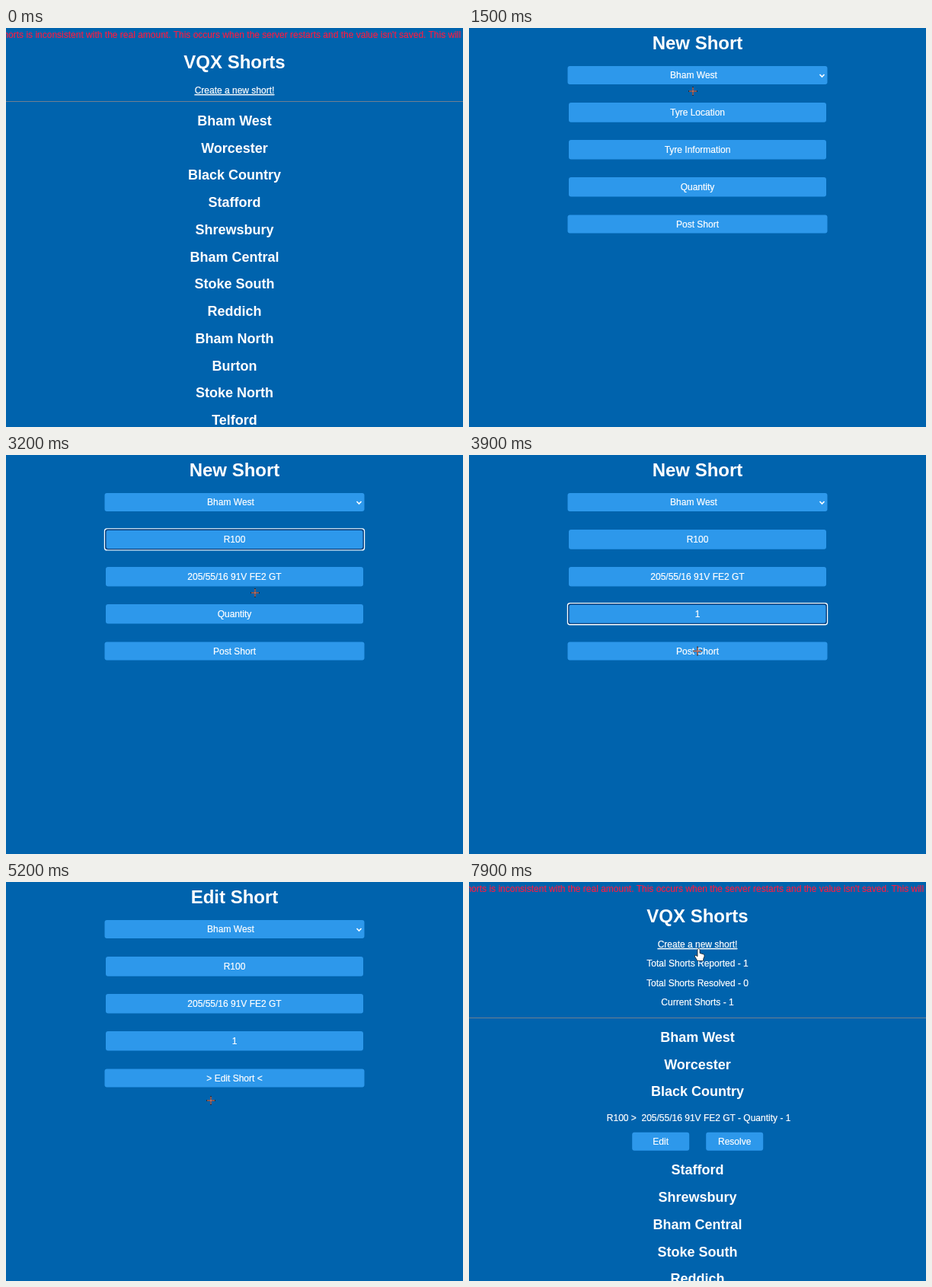
Write an HTML page that moves like this. It is 600 by 524 pixels and loops after 8 s.

```html
<!DOCTYPE html>
<html lang="en">
<head>
<meta charset="utf-8">
<title>Shorts</title>
<style>
html, body { margin: 0; width: 100%; height: 100%; overflow: hidden; background: #0063ad; }
svg { display: block; width: 600px; height: 524px; }
text { font: 12px "Liberation Sans", Arial, sans-serif; fill: #fff; stroke: #fff; stroke-width: .2;
  text-anchor: middle; white-space: pre; }
.h1 { font-size: 24px; font-weight: bold; stroke: none; }
.h2 { font-size: 18px; font-weight: bold; stroke: none; }
.link { text-decoration: underline; }
.warn { fill: #f51e46; stroke: #f51e46; text-anchor: start; }
.box { fill: #2d98eb; }
.line { fill: #6f7f92; }
.ring { fill: none; stroke: #fff; stroke-width: 1.4; }
.inner { stroke: #0b3f7c; }
</style>
</head>
<body>
<svg viewBox="0 0 600 524">
  <g id="pages"></g>
  <g id="cross">
    <path d="M-6 0H6M0-6V6" stroke="#1d2026" stroke-width="2" stroke-opacity=".75"/>
    <path d="M-5 0H5M0-5V5" stroke="#f08068"/>
  </g>
  <path id="hand" fill="#fff" stroke="#111" stroke-width=".7" stroke-linejoin="round"
    d="M-1.5 1Q0-1 1.5 1V6L6 7.2Q8 8 7.5 10L6 14V16H-1.5L-5 10.5Q-5.5 8.3-3.5 8.8L-1.5 10.3Z"/>
</svg>
<script>
const LOOP = 8000, MID = 300, PITCH = 35.73;
const SPEC = '205/55/16 91V FE2 GT';
const DEPOTS = ['Bham West', 'Worcester', 'Black Country', 'Stafford', 'Shrewsbury', 'Bham Central',
  'Stoke South', 'Reddich', 'Bham North', 'Burton', 'Stoke North', 'Telford'];
const WARNING = "horts is inconsistent with the real amount. This occurs when the server " +
  "restarts and the value isn't saved. This will be";
const $ = id => document.getElementById(id);
const show = (el, on) => el.style.display = on ? '' : 'none';
const place = (el, x, y) => el.setAttribute('transform', `translate(${x} ${y})`);
const row = i => 62 + 48.9 * i; // middle of a form row

function add(parent, tag, attrs, content = '') {
  const el = document.createElementNS('http://www.w3.org/2000/svg', tag);
  for (const key in attrs) el.setAttribute(key, attrs[key]);
  el.textContent = content;
  return parent.appendChild(el);
}
const label = (g, x, y, content, cls = '') => add(g, 'text', { x, y, class: cls }, content);

// Rounded rectangle around a middle point
const box = (g, x, y, width, height, cls = 'box') =>
  add(g, 'rect', { x: x - width / 2, y: y - height / 2, width, height, rx: 3, class: cls });

// The depot list; "holder" is the depot that has the reported short, -1 for none.
function listPage(holder) {
  const g = add($('pages'), 'g');
  label(g, -3.6, 13, WARNING, 'warn');
  label(g, MID, 53, 'VQX Shorts', 'h1');
  label(g, MID, 86, 'Create a new short!', 'link');
  const counts = holder < 0 ? [] :
    ['Total Shorts Reported - 1', 'Total Shorts Resolved - 0', 'Current Shorts - 1'];
  counts.forEach((s, i) => label(g, MID, 111.3 + 25.3 * i, s));

  let y = 128 + 27.3 * counts.length;
  add(g, 'rect', { x: 0, y: Math.round(y - 32), width: 600, height: 1, class: 'line' });
  DEPOTS.forEach((name, i) => {
    label(g, MID, y, name, 'h2');
    if (i === holder) {
      label(g, MID + 1.6, y + 33, `R100 >  ${SPEC} - Quantity - 1`);
      ['Edit', 'Resolve'].forEach((s, k) => {
        const x = 251.7 + 97 * k;
        box(g, x, y + 59.5, 75, 24);
        label(g, x, y + 63.2, s);
      });
      y += 67.3;
    }
    y += PITCH;
  });
  return g;
}

function formPage(title, action) {
  const g = add($('pages'), 'g');
  label(g, MID, 28, title, 'h1');
  const texts = [0, 1, 2, 3, 4].map(i => {
    const field = i % 4 > 0;
    box(g, MID, row(i), field ? 338 : 341, field ? 25.6 : 24);
    return label(g, i ? MID : 295, row(i) + 3.9, '');
  });
  add(g, 'path', { d: 'M460.5 61l3 3l3-3', fill: 'none', stroke: '#fff', 'stroke-width': 1.6 });
  const ring = add(g, 'g');
  box(ring, MID, 0, 341, 28, 'ring');
  box(ring, MID, 0, 338.4, 25.4, 'ring inner');

  g.fill = (values, focus) => {
    texts.forEach((el, i) => el.textContent = [...values, action][i]);
    show(ring, focus > 0);
    place(ring, 0, row(focus));
  };
  return g;
}

const empty = listPage(-1), posted = listPage(0), moved = listPage(2);
const create = formPage('New Short', 'Post Short');
const edit = formPage('Edit Short', '> Edit Short <');
const SCENES = [[0, empty], [1200, create], [4100, posted], [4900, edit], [6400, moved]];

// Pointer stops: time, x, y
const STOPS = [
  [150, 430, 535], [900, 294, 83], [1500, 294, 83], [1800, MID, row(1)], [2500, MID, row(1)],
  [3200, 327, 181], [3900, MID, row(4)], [4700, 252, 275], [5200, 269, 287],
  [5800, 296, row(0)], [6300, 430, row(4)], [6500, 413, 445], [7300, 312, 130],
  [7550, 312, 130], [7850, 301.5, 87.5]
];

function pointer(t) {
  const next = STOPS.findIndex(s => s[0] > t);
  if (next < 1) return (next ? STOPS[STOPS.length - 1] : STOPS[0]).slice(1);
  const [t0, x0, y0] = STOPS[next - 1], [t1, x1, y1] = STOPS[next];
  const p = (t - t0) / (t1 - t0), e = p * p * (3 - 2 * p);
  return [x0 + (x1 - x0) * e, y0 + (y1 - y0) * e];
}

function draw(t) {
  const page = SCENES.filter(s => s[0] <= t).pop()[1];
  for (const [, g] of SCENES) show(g, g === page);

  const typed = 'R100'.slice(0, Math.max(0, Math.floor((t - 1900) / 100)));
  create.fill(
    [DEPOTS[0], typed || 'Tyre Location', t < 2600 ? 'Tyre Information' : SPEC, t < 3600 ? 'Quantity' : '1'],
    t < 1900 ? 0 : t < 3400 ? 1 : 3);
  edit.fill([DEPOTS[t < 6000 ? 0 : 2], 'R100', SPEC, '1'], 0);

  const [x, y] = pointer(t);
  const onLink = !page.fill && Math.abs(x - MID) < 53 && Math.abs(y - 82) < 8;
  show($('cross'), t >= 150 && !onLink);
  show($('hand'), onLink);
  place($('cross'), x, y);
  place($('hand'), x, y);
}

function tick() {
  draw(performance.now() % LOOP);
  requestAnimationFrame(tick);
}
tick();
</script>
</body>
</html>
```
